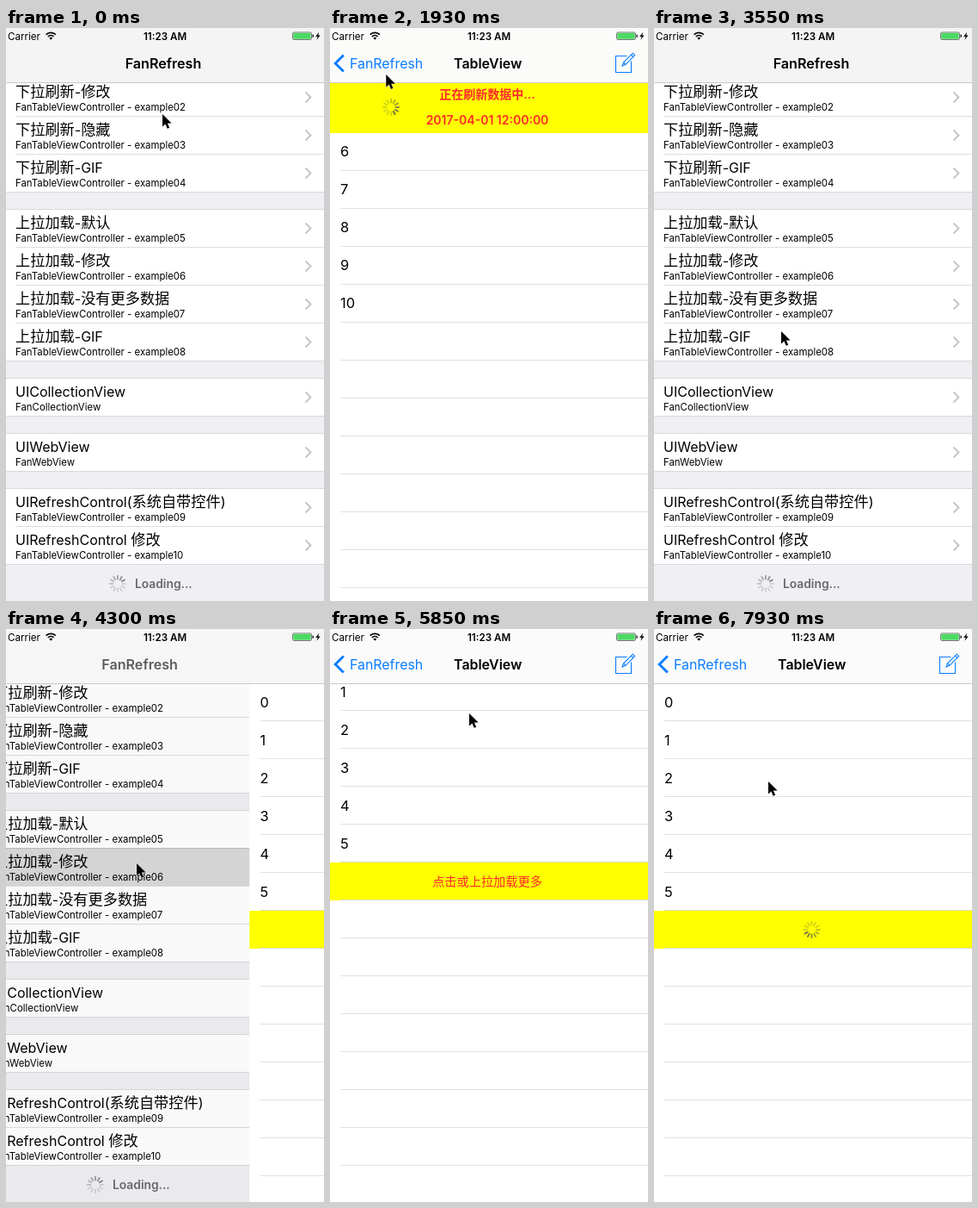
Recreate the animation shown at these times as an HTML page. Size 370 px wide and 665 px high, loop 7990 ms.

```html
<!DOCTYPE html>
<html lang="zh">
<head>
<meta charset="utf-8">
<style>
html, body { margin: 0; width: 100%; height: 100%; overflow: hidden; background: #fff; }
svg { display: block; width: 370px; height: 665px; font-family: Inter, 'Noto Sans CJK SC', 'Noto Sans CJK', sans-serif; }
text { white-space: pre; }
</style>
</head>
<body>
<svg id="stage" viewBox="0 0 370 665"></svg>
<script>
const LOOP = 7990, W = 370, BLUE = '#0a7cff', YELLOW = '#ffff00', RED = '#ff2a2a', GROUP = '#efeff4';
const range = n => [...Array(n).keys()];

// Markup helpers
const rect = (x, y, w, h, fill, extra = '') =>
  `<rect x="${x}" y="${y}" width="${w}" height="${h}" fill="${fill}" ${extra}/>`;
const text = (x, y, size, str, extra = '') =>
  `<text x="${x}" y="${y}" font-size="${size}" ${extra}>${str}</text>`;
const group = (id, body, extra = '') => `<g id="${id}" ${extra}>${body}</g>`;
const mixed = str => str.replace(/[\u4e00-\u9fff]+/g, s => `<tspan font-size="17.2">${s}</tspan>`);
const spinner = (id, x, y, color) => `<g transform="translate(${x} ${y})">` + group(id,
  range(12).map(i => `<path d="M0 -5.5V-9.2" transform="rotate(${i * 30})" opacity="${i < 6 ? 0.25 : 0.25 + (i - 5) * 0.1}"/>`).join(''),
  `stroke="${color}" stroke-width="1.9" stroke-linecap="round"`) + '</g>';

// Main menu
const table = n => `FanTableViewController - example${n}`;
const sections = [
  [58, ['下拉刷新-修改', table('02')], ['下拉刷新-隐藏', table('03')], ['下拉刷新-GIF', table('04')]],
  [210, ['上拉加载-默认', table('05')], ['上拉加载-修改', table('06')], ['上拉加载-没有更多数据', table('07')], ['上拉加载-GIF', table('08')]],
  [406, ['UICollectionView', 'FanCollectionView']],
  [470, ['UIWebView', 'FanWebView']],
  [534, ['UIRefreshControl(系统自带控件)', table('09')], ['UIRefreshControl 修改', table('10')]]
];

const menuCell = ([title, detail], y, first) =>
  (first ? '' : rect(11, y, W - 11, 1, '#dedee1')) +
  text(11, y + 22, 16, mixed(title)) +
  text(11, y + 37.5, 11.4, detail) +
  `<path d="M348.5 ${y + 16.5}l6 6-6 6" fill="none" stroke="#c4c4c9" stroke-width="1.9"/>`;

const menuSection = ([top, ...cells]) => {
  const h = cells.length * 44;
  return rect(0, top, W, h + 1, '#d9d9dd') + rect(0, top + 1, W, h - 1, '#fff') +
    cells.map((c, i) => menuCell(c, top + i * 44, !i)).join('');
};

const menu = rect(0, 0, W, 665, GROUP) + sections.map(menuSection).join('') +
  rect(0, 58, W, 44, '#000', 'id="pressed" opacity="0"') +
  spinner('menuSpin', 130, 645, '#777') +
  text(150, 650, 13.8, 'Loading...', 'font-weight="600" fill="#6a6a6c"') +
  rect(0, 0, W, 665, '#000', 'id="dim" opacity="0"');

// Detail tables
const lines = range(14).map(i => rect(12, 106 + i * 44, W, 1, '#e1e1e3')).join('');
const numbers = (id, from, to) => group(id,
  range(to - from + 1).map(i => text(12, 90.5 + i * 44, 16.4, from + i)).join(''));
const bold = `text-anchor="middle" font-weight="600" fill="${RED}"`;

const header = rect(0, 4, W, 59, YELLOW) + spinner('headSpin', 71, 33, '#555') +
  text(183, 23, 14, '正在刷新数据中...', bold) +
  text(183, 53, 14, '2017-04-01 12:00:00', bold);
const footer = rect(0, 327, W, 44, YELLOW) + rect(12, 326, W, 1, '#dcdcc0') + rect(12, 370, W, 1, '#dcdcc0') +
  text(183, 354, 14.2, '点击或上拉加载更多', `id="footText" text-anchor="middle" font-weight="500" fill="${RED}"`) +
  group('footSpinBox', spinner('footSpin', 183.5, 349, '#555'));

const page = (id, body) => group(id, rect(0, 0, W, 665, '#fff') + group(id + 'Body', body));

// Bars
const statusBar = text(2, 13.5, 11.6, 'Carrier') +
  `<g fill="none" stroke="#000" stroke-width="1.7"><path d="M46.6 7.6a8 8 0 0 1 11.2 0M48.8 10a5 5 0 0 1 6.8 0"/></g>
   <path d="M50.2 11.6a3 3 0 0 1 4 0L52.2 13.8z"/>` +
  text(185, 13.5, 11.6, '11:23 AM', 'text-anchor="middle" font-weight="600"') +
  rect(333.5, 5, 22, 8.5, '#fff', 'rx="1.6" stroke="#555" stroke-width=".8"') +
  rect(334.3, 5.8, 20.4, 6.9, '#4cd964', 'rx="1"') + rect(356.4, 7.5, 1.5, 3.5, '#333', 'rx=".7"') +
  '<path d="M364.2 4.8l-4 5.2h2.4l-1.1 3.8 4.2-5.2h-2.5z"/>';

const compose = `<g fill="none" stroke="${BLUE}" stroke-width="1.1">
  <path d="M345.5 32.5H332.5V51.5H350.5V38.5"/>
  <path d="M340 44l1.6-4.2L352.3 29.2l2.4 2.4L344 42.3zM341.6 39.8l2.4 2.5M350.4 31.1l2.4 2.4"/></g>`;

const navBar = rect(0, 0, W, 63, '#f4f4f4', 'id="barFill"') + rect(0, 63, W, 1, '#c9c9cb') + statusBar +
  text(0, 47, 16.1, 'FanRefresh', 'id="homeTitle" text-anchor="middle" font-weight="600"') +
  group('detailNav',
    group('backArrow', `<path d="M15.8 31.5L6.2 41l9.6 9.5" fill="none" stroke="${BLUE}" stroke-width="2.9"/>`) +
    text(0, 47, 15.9, 'FanRefresh', `id="backLabel" fill="${BLUE}"`) +
    text(0, 47, 15.9, 'TableView', 'id="pageTitle" text-anchor="middle" font-weight="600"') + compose);

const cursor = `<path id="cursor" d="M0 0V14.6L3.4 11.5 5.7 16.8 8.2 15.7 5.9 10.6H10.6z" stroke="#fff" stroke-width="1" paint-order="stroke"/>`;

document.getElementById('stage').innerHTML = group('menu', menu) +
  page('refresh', lines + numbers('before', 0, 5) + numbers('after', 6, 10) + header) +
  page('more', lines + numbers('all', 0, 5) + footer) + navBar + cursor;

// Motion
const el = Object.fromEntries([...document.querySelectorAll('[id]')].map(e => [e.id, e]));
const set = (id, name, value) => el[id].setAttribute(name, value);
const move = (id, x, y = 0) => set(id, 'transform', `translate(${x.toFixed(2)} ${y.toFixed(2)})`);
const show = (id, on) => set(id, 'visibility', on ? 'visible' : 'hidden');
const mix = (a, b, p) => a + (b - a) * p;
const clamp = v => Math.min(1, Math.max(0, v));
const ease = p => p * p * (3 - 2 * p);
const phase = (t, a, b) => ease(clamp((t - a) / (b - a)));
const spring = (ms, rate = 0.018) => ms <= 0 ? 0 : 1 - (1 + rate * ms) * Math.exp(-rate * ms);
const mixColor = (a, b, p) => `rgb(${a.map((v, i) => Math.round(mix(v, b[i], p)))})`;

const PUSH = 420, POP = 2880, PUSH2 = 4250;
const GREY = [244, 244, 244], PALE = [251, 251, 251], TINT = [247, 247, 197];

// time, x, y of the pointer tip
const pointer = [
  [0, 182, 100], [60, 182, 100], [120, 176, 91], [1300, 176, 91], [2200, 35, 44], [2900, 35, 44],
  [3550, 148, 352], [4150, 152, 272], [4300, 152, 272], [4790, 158, 225], [5560, 158, 225],
  [5850, 162, 98], [5910, 162, 92], [6090, 162, 92], [6700, 186, 173], [7190, 186, 173], [7850, 133, 177], [LOOP, 133, 177]
];

function pointerAt(t) {
  const i = pointer.findIndex((k, n) => n && t <= k[0]);
  const [a, b] = [pointer[i - 1], pointer[i]];
  const p = phase(t, a[0], b[0]);
  return [mix(a[1], b[1], p), mix(a[2], b[2], p)];
}

function draw(t) {
  const popping = t >= POP && t < PUSH2;
  const second = t >= PUSH2;
  const p = second ? spring(t - PUSH2) : popping ? 1 - spring(t - POP) : spring(t - PUSH);
  const x = W * (1 - p);
  const collapse = phase(t, 1900, 2300);

  move('menu', -0.3 * W * p);
  set('dim', 'opacity', 0.1 * p);
  set('pressed', 'y', second ? 254 : 58);
  set('pressed', 'opacity', 0.15 * (popping ? p : +(t >= PUSH)));

  show('refresh', !second && p > 0.001);
  show('more', second);
  move('refresh', x);
  move('more', x);

  move('refreshBody', 0, 60 * (1 - collapse));
  set('before', 'display', t < 1900 ? 'inline' : 'none');
  set('after', 'display', t < 1900 ? 'none' : 'inline');

  const drag = t < 5850 ? 56 * phase(t, 5560, 5850) : mix(56, 59, phase(t, 5850, 5910));
  move('moreBody', 0, -drag * (1 - spring(t - 6060, 0.0115)));
  const loading = t >= 7020;
  set('footText', 'display', loading ? 'none' : 'inline');
  set('footSpinBox', 'display', loading ? 'inline' : 'none');

  const turn = ms => `rotate(${Math.floor(Math.max(0, ms) / 83.3) * 30 % 360})`;
  set('headSpin', 'transform', turn(t - PUSH));
  set('footSpin', 'transform', turn(t - 7107));
  set('menuSpin', 'transform', 'rotate(90)');

  const pageFill = second ? PALE : PALE.map((v, i) => mix(v, TINT[i], collapse));
  set('barFill', 'fill', mixColor(GREY, pageFill, p));
  move('homeTitle', mix(183, 66, p));
  set('homeTitle', 'opacity', clamp(1 - p * 1.6));
  set('detailNav', 'opacity', clamp(p * 1.6 - 0.6));
  show('detailNav', p > 0.01);
  set('backArrow', 'opacity', popping ? 0.25 : 1);
  move('backLabel', mix(138, popping ? 26 : 23, p));
  move('pageTitle', mix(W + 40, 183.7, p));

  move('cursor', ...pointerAt(t));
}

const start = performance.now();
function tick() {
  draw((performance.now() - start) % LOOP);
  requestAnimationFrame(tick);
}
tick();
</script>
</body>
</html>
```
